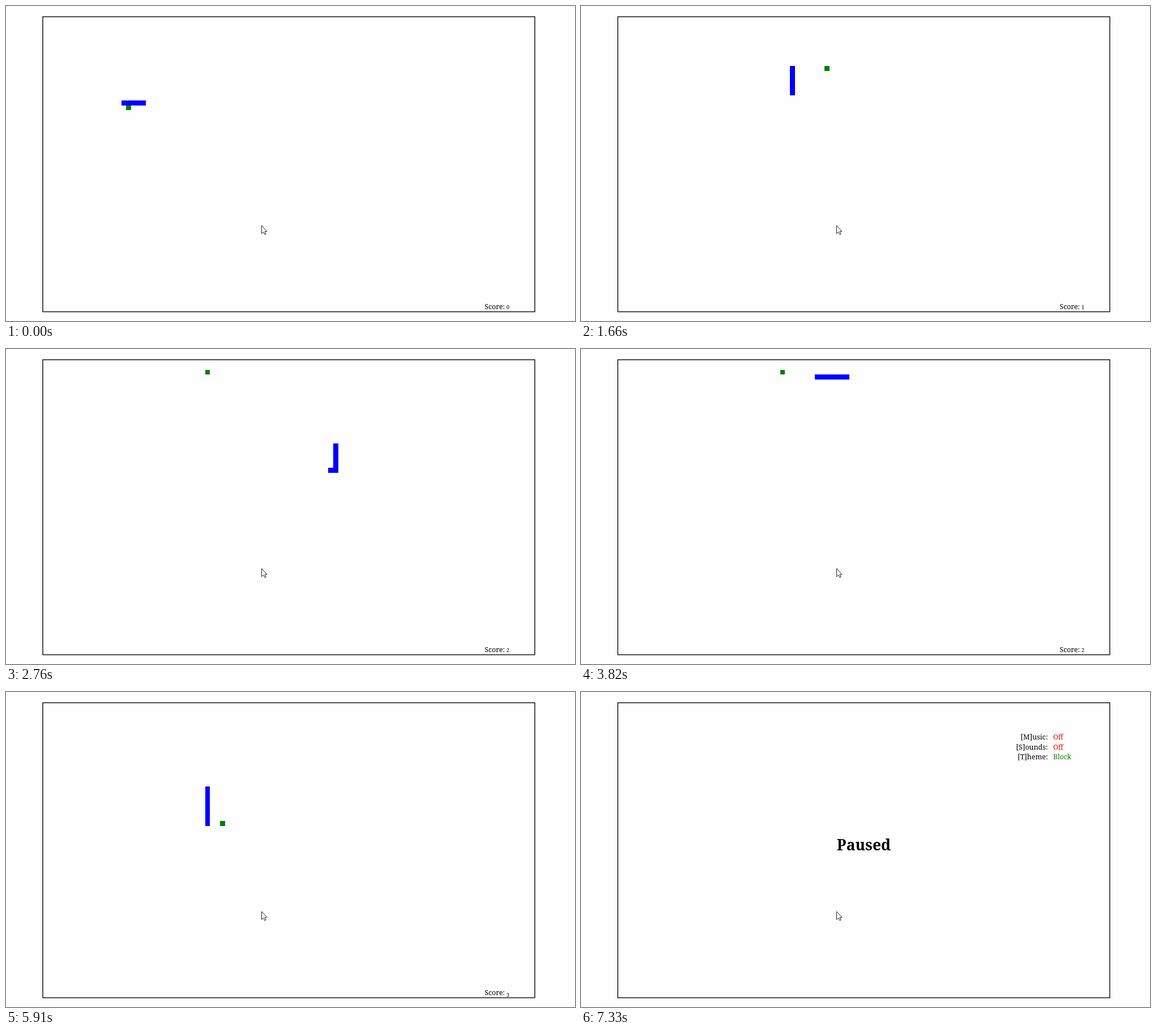
Animation of 1005 by 557 pixels, one loop 8000 ms. Source, as an HTML page:

```html
<!DOCTYPE html>
<html lang="en">
<head>
<meta charset="utf-8">
<title>Snake</title>
<style>
  html, body { margin: 0; width: 100%; height: 100%; overflow: hidden; background: #fefefe; }
  svg { display: block; width: 1005px; height: 557px; }
  text { font: 12.2px Georgia, "Noto Serif", serif; white-space: pre; }
  .title { font-size: 26.4px; font-weight: bold; text-anchor: middle; }
  .label { font-size: 12.5px; text-anchor: end; }
  #digit { font-size: 9px; }
  .off { fill: #f00; }
  .on, #food { fill: #008000; }
  #snake { fill: #00f; }
  #snake, #food { shape-rendering: crispEdges; }
</style>
</head>
<body>
<svg viewBox="0 0 1005 557">
  <rect x="65" y="19" width="869" height="521.6" fill="none" stroke="#222" stroke-width="1.6"/>
  <g id="game">
    <path id="snake"/>
    <path id="food"/>
    <text x="845.5" y="536">Score: <tspan id="digit">0</tspan></text>
  </g>
  <g id="menu" visibility="hidden">
    <text class="label" x="824.5" y="84">[M]usic:</text><text class="off" x="834" y="84">Off</text>
    <text class="label" x="824.5" y="101.5">[S]ounds:</text><text class="off" x="834" y="101.5">Off</text>
    <text class="label" x="824.5" y="119">[T]heme:</text><text class="on" x="834" y="119">Block</text>
    <text class="title" x="499.5" y="280">Paused</text>
  </g>
  <path d="M451.5 388v14.5l3.2-3 2.3 4.6 2.2-1-2.2-4.4h4z" fill="#fff" stroke="#222"/>
</svg>
<script>
const LOOP = 8000, REFRESH = 137, CELL = 8.7, LEFT = 64.6, TOP = 19.1;

// stretches of steady play; the game is paused between them
const RUNS = [
  { start: 0, end: 1660, from: 0, to: 58 },
  { start: 1660, end: 3820, from: 58, to: 132 },
  { start: 3820, end: 4780, from: 132, to: 162 },
  { start: 5910, end: 6600, from: 166, to: 190 },
  { start: 6600, end: 7330, from: 190, to: 214 }
];

// corners of the route; moves alternate between x and y
const START = [20, 17];
const TURNS = [14, 23, 15, 18, 25, 20, 20, 21, 35, 10, 59, 22, 54, 3, 33, 1, 32, 17, 33, 36, 38, 24, 28, 10];

// each piece appears once the one before is eaten
const FOODS = [[17, 18], [42, 10], [33, 2], [36, 24], [52, 12]];
const LENGTH = 5;

const route = [START];
TURNS.forEach((end, i) => {
  const axis = i % 2;
  let cell = route[route.length - 1];
  while (cell[axis] !== end) {
    cell = [...cell];
    cell[axis] += Math.sign(end - cell[axis]);
    route.push(cell);
  }
});

// position along the route at which each piece is eaten
let reached = 0;
const meals = FOODS.map(([x, y]) =>
  reached = route.findIndex((c, i) => i >= reached && c[0] === x && c[1] === y));

const el = id => document.getElementById(id);
const px = i => Math.round(LEFT + i * CELL);
const py = j => Math.round(TOP + j * CELL);
const box = ([i, j]) => `M${px(i)} ${py(j)}H${px(i + 1)}V${py(j + 1)}H${px(i)}z`;

// the picture refreshes in equal steps within a run
function headAt(t, { start, end, from, to }) {
  const steps = Math.round((end - start) / REFRESH);
  const step = Math.floor((t - start) / (end - start) * steps);
  return LENGTH - 1 + from + Math.floor((to - from) * step / steps);
}

function draw(t) {
  const run = RUNS.find(r => t >= r.start && t < r.end);
  el("game").setAttribute("visibility", run ? "visible" : "hidden");
  el("menu").setAttribute("visibility", run ? "hidden" : "visible");
  if (!run) return;
  const head = headAt(t, run);
  const score = meals.filter(m => m >= 0 && m <= head).length;
  const size = LENGTH + score;
  el("snake").setAttribute("d", route.slice(head - size + 1, head + 1).map(box).join(""));
  el("food").setAttribute("d", box(FOODS[score]));
  // old-style figures: three and up hang below the line
  el("digit").setAttribute("dy", score > 2 ? 2.5 : 0);
  el("digit").textContent = score;
}

const begin = performance.now();
function frame() {
  draw((performance.now() - begin) % LOOP);
  requestAnimationFrame(frame);
}
frame();
</script>
</body>
</html>
```
